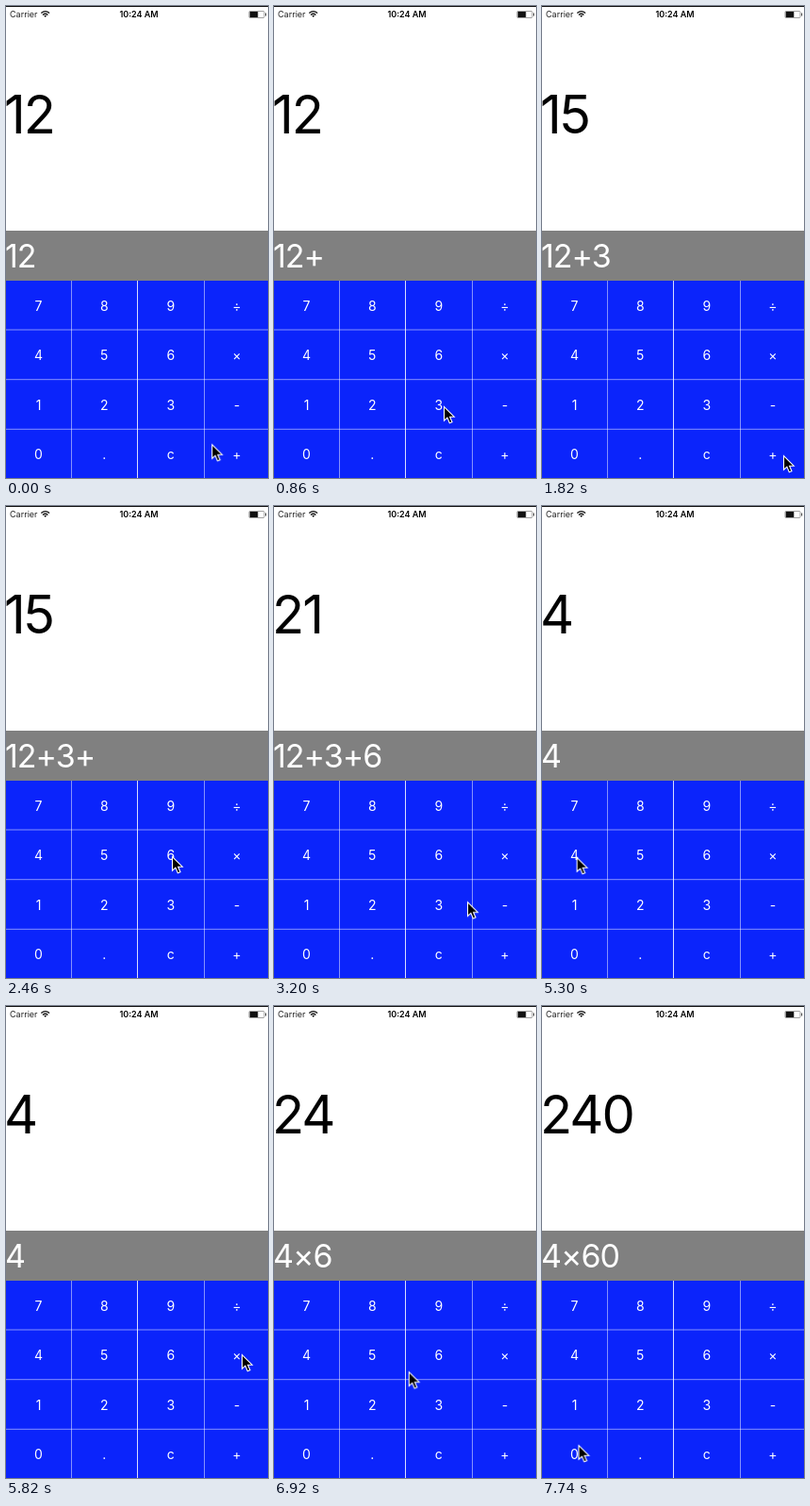
Write an HTML page that moves like this. It is 278 by 500 pixels and loops after 8000 ms.

```html
<!DOCTYPE html>
<html lang="en">
<head>
<meta charset="utf-8">
<title>Calculator</title>
<style>
  html, body { margin: 0; width: 100%; height: 100%; overflow: hidden; }
  body {
    position: relative; background: #fff; color: #000;
    font-family: Inter, Roboto, sans-serif;
  }
  .stage { position: absolute; left: 0; top: 0; width: 278px; height: 500px; overflow: hidden; }
  .stage > * { position: absolute; }

  .status { left: 0; top: 0; }
  .status text { font-size: 9px; }

  /* Each display is a one-line window onto a stack of ten values. */
  .display { left: 0; width: 278px; height: var(--line); overflow: hidden; white-space: pre; }
  .display div { animation: press 8s step-end infinite; }
  .display span { display: block; height: var(--line); line-height: var(--line); }
  .result { --line: 70px; top: 80px; font-size: 56px; letter-spacing: -2px; text-indent: -2px; }
  .entry {
    --line: 53px; top: 238px; font-size: 34px; letter-spacing: -1px; text-indent: -1px;
    background: #808080; color: #fff;
  }

  .keys {
    left: 0; top: 291px; width: 278px; height: 209px; background: #0b24fb; color: #fff;
    display: grid; grid-template: repeat(4, 52.5px) / 69px repeat(2, 70.5px) 70px;
    font-size: 14px;
  }
  .keys span { display: flex; align-items: center; justify-content: center; }
  .lines { left: 0; top: 291px; }

  .cursor { left: 0; top: 0; overflow: visible; animation: move 8s ease-in-out infinite; }

  @keyframes press {
    0% { transform: translateY(0); }
    3.75% { transform: translateY(-10%); }
    12% { transform: translateY(-20%); }
    23.75% { transform: translateY(-30%); }
    32.75% { transform: translateY(-40%); }
    51.5% { transform: translateY(-50%); }
    63% { transform: translateY(-60%); }
    76.5% { transform: translateY(-70%); }
    84.5% { transform: translateY(-80%); }
    95%, 100% { transform: translateY(-90%); }
  }
  @keyframes move {
    0% { transform: translate(218px, 464px); animation-timing-function: ease-out; }
    3.1%, 5.6% { transform: translate(239px, 475px); }
    10.25%, 13.75% { transform: translate(180px, 424px); }
    20.5% { transform: translate(253px, 473px); }
    22.75% { transform: translate(256px, 476px); }
    24.5% { transform: translate(255px, 475px); }
    30.75% { transform: translate(176px, 371px); }
    35.5% { transform: translate(177px, 372px); animation-timing-function: ease-in; }
    40% { transform: translate(205px, 419px); animation-timing-function: linear; }
    41% { transform: translate(203px, 432px); animation-timing-function: ease-out; }
    46.25% { transform: translate(180px, 465px); animation-timing-function: linear; }
    51%, 55.5% { transform: translate(178px, 471px); animation-timing-function: linear; }
    56.5% { transform: translate(96px, 430px); animation-timing-function: ease-out; }
    61.25%, 66% { transform: translate(36px, 372px); }
    72.75% { transform: translate(250px, 369px); }
    76%, 77.5% { transform: translate(251px, 366px); }
    81.75%, 84.5% { transform: translate(176px, 366px); animation-timing-function: ease-in; }
    86.5% { transform: translate(143px, 387px); animation-timing-function: ease-out; }
    94%, 100% { transform: translate(38.5px, 465px); }
  }
</style>
</head>
<body>
<div class="stage">
  <svg class="status" width="278" height="18">
    <rect width="278" height="1" fill="#111"/>
    <text x="4" y="12" fill="#222">Carrier</text>
    <g fill="none" stroke="#111" stroke-width="1.3">
      <path d="M37.3 7.6Q41.7 3.6 46.1 7.6M39 9.5Q41.7 7.1 44.4 9.5"/>
      <path d="M40.3 10.3L41.7 12L43.1 10.3Q41.7 9.3 40.3 10.3Z" fill="#111" stroke="none"/>
    </g>
    <text x="141" y="12" text-anchor="middle" font-weight="600">10:24 AM</text>
    <rect x="258" y="5.5" width="16" height="7" rx="1" fill="#fff" stroke="#777" stroke-width=".7"/>
    <rect x="258.7" y="6" width="8.6" height="6" fill="#111"/>
    <rect x="275" y="7.5" width="1.2" height="3" fill="#555"/>
  </svg>

  <div class="display result"><div><span>12</span><span>12</span><span>15</span><span>15</span><span>21</span><span>0</span><span>4</span><span>4</span><span>24</span><span>240</span></div></div>
  <div class="display entry"><div><span>12</span><span>12+</span><span>12+3</span><span>12+3+</span><span>12+3+6</span><span></span><span>4</span><span>4×</span><span>4×6</span><span>4×60</span></div></div>

  <div class="keys">
    <span>7</span><span>8</span><span>9</span><span>÷</span>
    <span>4</span><span>5</span><span>6</span><span>×</span>
    <span>1</span><span>2</span><span>3</span><span>-</span>
    <span>0</span><span>.</span><span>c</span><span>+</span>
  </div>
  <svg class="lines" width="278" height="209" fill="none" stroke="#fff">
    <path d="M69.5 0V209M210.5 0V209M0 52H278M0 104.7H278M0 157.3H278" stroke-opacity=".5"/>
    <path d="M139.5 0V209" stroke-opacity=".85"/>
  </svg>

  <svg class="cursor" width="14" height="21">
    <path d="M.5 .5V15.2L3.9 12.1L6.3 17.8L9 16.7L6.6 11.2H11.2Z" fill="#000" stroke="#fff" stroke-width="1.1"/>
  </svg>
</div>
</body>
</html>
```
